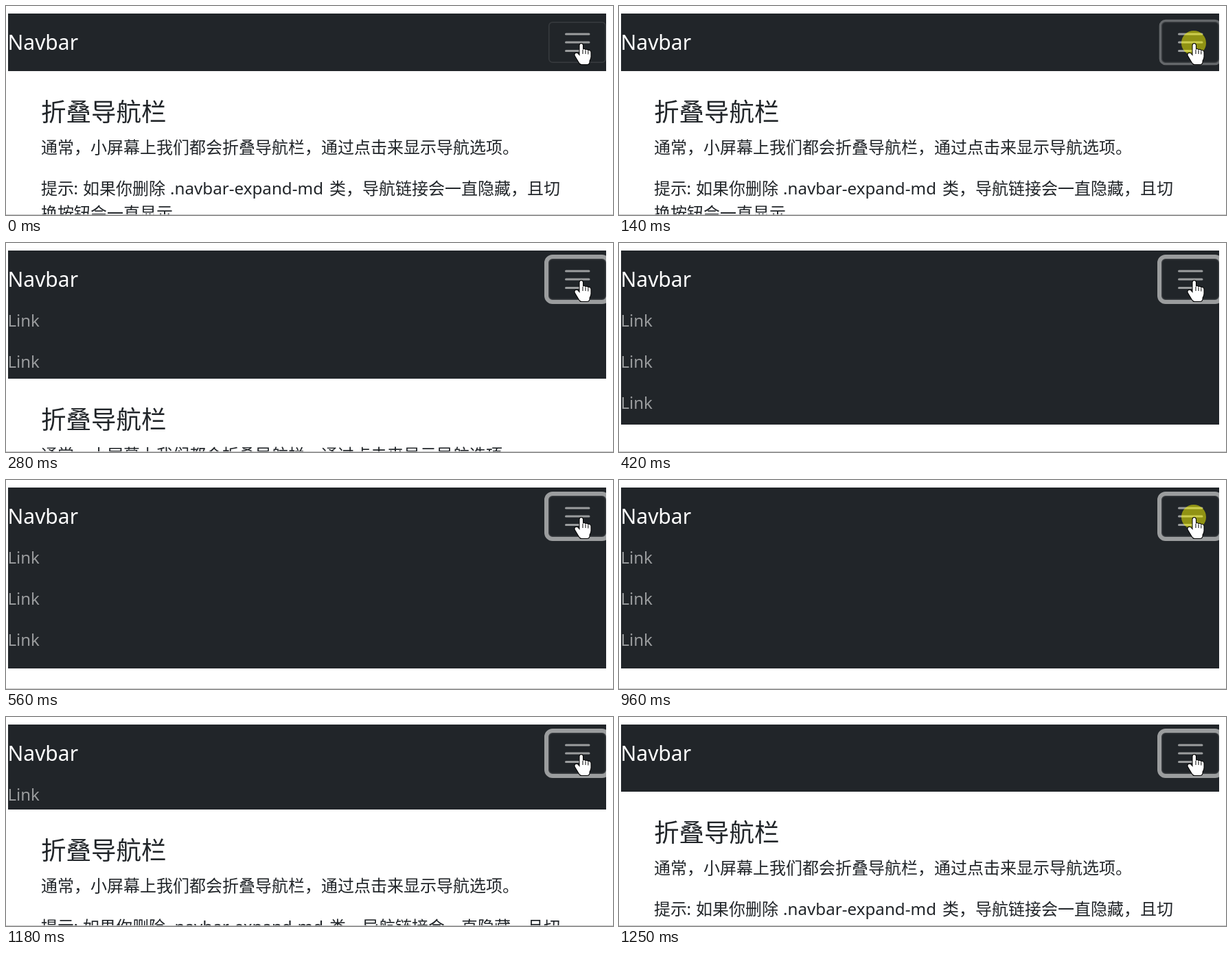
Recreate the animation shown at these times as an HTML page with a canvas. Size 884 by 305 pixels, loop 1320 ms.

```html
<!DOCTYPE html>
<html lang="zh-CN">
<head>
<meta charset="utf-8">
<title>折叠导航栏</title>
<style>
html, body { margin: 0; width: 100%; height: 100%; overflow: hidden; background: #fff; }
canvas { display: block; }
</style>
</head>
<body>
<canvas id="stage" width="884" height="305"></canvas>
<script>
const ctx = document.getElementById('stage').getContext('2d');
const LOOP = 1320;
const DARK = '#212529';
const MUTED = 'rgba(255,255,255,.55)';
const LATIN = '"Noto Sans", "Open Sans", sans-serif';
const CJK = '"Noto Sans CJK SC", "Noto Sans CJK", "Noto Sans", sans-serif';
const MENU_HEIGHT = 180;
const SLIDE = 370;
const OPEN_AT = 157, CLOSE_AT = 1004;
const CLOSE_STEPS = [960, 1030, 1110, 1180, 1250];

const clamp = v => Math.min(1, Math.max(0, v));

// CSS-style cubic-bezier timing
function bezier(x1, y1, x2, y2) {
  const at = (a, b, s) => 3 * a * s * (1 - s) ** 2 + 3 * b * s * s * (1 - s) + s ** 3;
  return x => {
    if (x <= 0 || x >= 1) return clamp(x);
    let lo = 0, hi = 1;
    for (let i = 0; i < 24; i++) {
      const mid = (lo + hi) / 2;
      if (at(x1, x2, mid) < x) lo = mid; else hi = mid;
    }
    return at(y1, y2, lo);
  };
}
const ease = bezier(.25, .1, .25, 1);
const easeInOut = bezier(.42, 0, .58, 1);

// The picture advances in discrete steps with a long hold while open
function stepTime(t) {
  if (t < 560) return Math.floor(t / 70) * 70;
  if (t < 960) return 560;
  return CLOSE_STEPS.filter(s => s <= t).pop();
}

function text(str, x, y, size, color, family) {
  ctx.font = `${size}px ${family}`;
  ctx.fillStyle = color;
  ctx.fillText(str, x, y);
}

function drawArticle(dy) {
  const zh = (str, x, y, size = 24) => text(str, x, y + dy, size, DARK, CJK);
  const en = (str, x, y) => text(str, x, y + dy, 24.2, DARK, LATIN);
  zh('折叠导航栏', 51, 168, 36.5);
  zh('通常，小屏幕上我们都会折叠导航栏，通过点击来显示导航选项。', 51, 215);
  zh('提示', 51, 275);
  en(':', 98.5, 275);
  zh('如果你删除', 112, 275);
  en('.navbar-expand-md', 239, 275);
  zh('类，导航链接会一直隐藏，且切', 471, 275);
  zh('换按钮会一直显示。', 51, 311);
}

function drawLinks(height) {
  ctx.save();
  ctx.beginPath();
  ctx.rect(3, 83, 871, height);
  ctx.clip();
  for (let i = 0; i < 3; i++) text('Link', 2.5, 122 + i * 60, 24, MUTED, LATIN);
  ctx.restore();
}

function drawToggler(focus) {
  ctx.strokeStyle = 'rgba(255,255,255,.1)';
  ctx.lineWidth = 1.5;
  ctx.beginPath();
  ctx.roundRect(790.75, 23.75, 82.5, 58.5, 5.25);
  ctx.stroke();

  if (focus > 0) {
    const w = 6 * focus;
    ctx.fillStyle = `rgba(255,255,255,${.55 * focus})`;
    ctx.beginPath();
    ctx.roundRect(790 - w, 23 - w, 84 + 2 * w, 60 + 2 * w, 6 + w);
    ctx.roundRect(790, 23, 84, 60, 6);
    ctx.fill('evenodd');
  }

  ctx.strokeStyle = MUTED;
  ctx.lineWidth = 3;
  ctx.lineCap = 'round';
  ctx.beginPath();
  for (const y of [41, 53, 65.5]) {
    ctx.moveTo(815.5, y);
    ctx.lineTo(849, y);
  }
  ctx.stroke();
}

function drawClick() {
  ctx.fillStyle = 'rgba(255,255,0,.5)';
  ctx.beginPath();
  ctx.arc(837, 54, 18, 0, Math.PI * 2);
  ctx.fill();
}

const hand = new Path2D(
  'M835.5 57.5 Q835.5 55 837.7 55 Q840 55 840 57.5 V64 ' +
  'Q841.8 61.8 844 64.3 Q846 62.6 847.8 65.2 Q851.5 64.3 851.5 68 ' +
  'V74 Q851.3 77 849.5 80 V82 Q849 85 846 85 H838.5 Q835.8 85 834.5 82 ' +
  'L828.8 72.5 Q827.8 70 830 69 Q832 68.3 834 71 L835.5 73 Z');
const creases = new Path2D('M840 64 V70 M844 64.5 V70 M847.8 65.5 V70.5');

function drawHand() {
  ctx.lineJoin = 'round';
  ctx.lineWidth = 2;
  ctx.strokeStyle = '#000';
  ctx.stroke(hand);
  ctx.fillStyle = '#fff';
  ctx.fill(hand);
  ctx.lineWidth = 1;
  ctx.lineCap = 'butt';
  ctx.stroke(creases);
}

function draw(time) {
  const t = stepTime(time);
  const shown = ease(clamp((t - OPEN_AT) / SLIDE)) - ease(clamp((t - CLOSE_AT) / SLIDE));
  const height = Math.round(MENU_HEIGHT * shown);
  const focus = easeInOut(clamp((t - 60) / 150));
  const pressed = (t >= 70 && t < OPEN_AT) || (t >= 960 && t < CLOSE_AT);

  ctx.fillStyle = '#fff';
  ctx.fillRect(0, 0, 884, 305);
  drawArticle(height);

  ctx.fillStyle = DARK;
  ctx.fillRect(3, 11, 871, 84 + height);
  text('Navbar', 2.5, 64, 30, '#fff', LATIN);
  drawLinks(height);
  drawToggler(focus);
  if (pressed) drawClick();
  drawHand();

  ctx.fillStyle = '#c8c8c8';
  ctx.fillRect(0, 304, 884, 1);
}

const start = performance.now();
function loop() {
  draw((performance.now() - start) % LOOP);
  requestAnimationFrame(loop);
}
loop();
</script>
</body>
</html>
```
